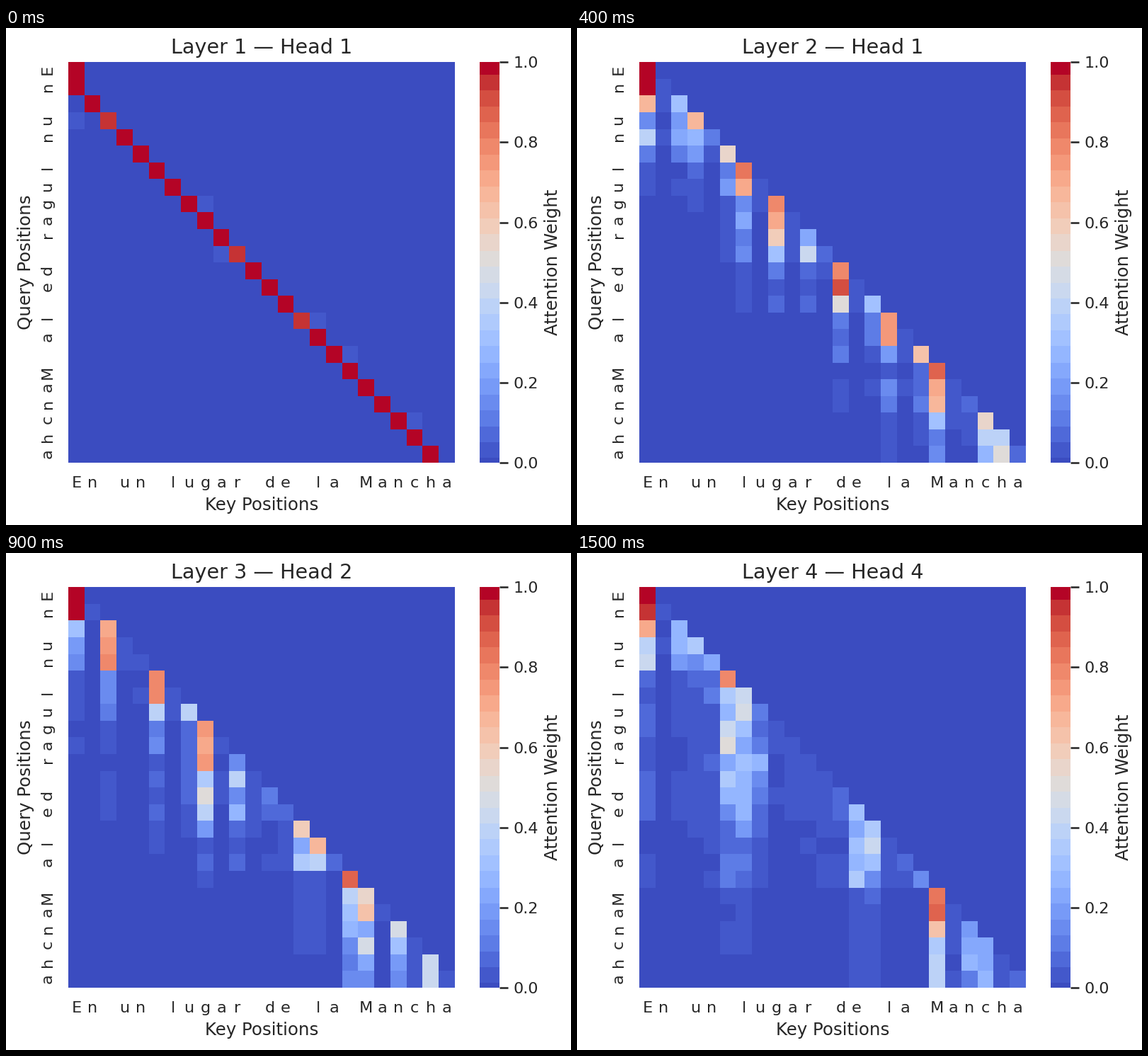
These frames come from a looping animation (798x702 px, 1.6 s). A matplotlib script:

```python
import numpy as np
import matplotlib.pyplot as plt
from matplotlib.animation import FuncAnimation
from matplotlib.colors import ListedColormap

W, H, DPI = 798, 702, 150
PT = 0.98  # scale of all point sizes
TEXT = "En un lugar de la Mancha"
N = len(TEXT)
INK = "0.15"
LAG = np.arange(N)[:, None] - np.arange(N)

plt.rcParams.update({
    "font.family": "DejaVu Sans", "text.color": INK, "axes.labelcolor": INK,
    "xtick.color": INK, "ytick.color": INK, "axes.labelsize": 12 * PT,
    "xtick.labelsize": 11 * PT, "ytick.labelsize": 11 * PT,
})


def banded_coolwarm():
    """Coolwarm reduced to flat steps."""
    levels = np.r_[0, np.arange(.01, 1, .04), 1]
    mids = (levels[:-1] + levels[1:]) / 2
    mids[0], mids[-1] = 0, 1
    band = np.searchsorted(levels[1:-1], np.linspace(0, 1, 512), side="right")
    return ListedColormap(plt.get_cmap("coolwarm")(mids)[band])


def causal(w):
    w = np.where(LAG >= 0, w, 0)
    return w / w.sum(axis=1, keepdims=True)


def attend(seed, reach, strong=(), mild=(), noise=.35):
    """Softmax over key gains that fade with distance."""
    gain = np.full(N, -1.5)
    gain[list(mild)] = 1
    gain[list(strong)] = 2.5
    jitter = np.random.default_rng(seed).normal(scale=noise, size=(N, N))
    return causal(np.exp(gain + jitter - np.maximum(LAG, 0) / reach))


def wander(seed, reach):
    """Attention to randomly chosen strong and mild keys."""
    order = np.random.default_rng(seed).permutation(np.arange(1, N))
    return attend(seed, reach, [0, *order[:6]], order[6:14])


def previous_token(seed):
    miss = np.random.default_rng(seed).exponential(.022, (N, 1))
    miss[:2] = 0
    shift = np.eye(N)[np.maximum(np.arange(N) - 1, 0)]
    return (1 - miss) * shift + miss * attend(seed, 3, noise=1.2)


def uniform(seed):
    w = 1 + np.random.default_rng(seed).normal(scale=.03, size=(N, N))
    w[:, 0] = 1.28
    return causal(w)


HEADS = [
    previous_token(3),
    attend(21, 2, [0]),
    uniform(5),
    attend(22, 6, [0]),

    attend(31, 1.5, (0, 6, 8, 12, 15, 18), (2, 3, 5, 10, 14, 17, 21, 22)),
    wander(32, 1.5),
    attend(33, 1.5, (0, 2, 6, 8, 14, 17), (4, 5, 10, 11, 13, 15, 18, 20, 22)),
    wander(34, 1.5),

    wander(41, 2),
    attend(42, 2, (0, 2, 5, 8, 17, 18), (7, 10, 14, 15, 20, 22)),
    wander(43, 2),
    wander(44, 2),

    wander(51, 2),
    attend(52, 2, (0, 2, 5, 7, 17, 18, 20), (1, 3, 8, 11, 13, 14, 15, 16, 22)),
    wander(53, 3),
    attend(54, 3, (0, 5, 6, 18), (2, 3, 4, 7, 13, 14, 20, 21)),
]


def box(x0, y0, x1, y1):
    return [x0 / W, 1 - y1 / H, (x1 - x0) / W, (y1 - y0) / H]


fig = plt.figure(figsize=(W / DPI, H / DPI), dpi=DPI, facecolor="white")
ax = fig.add_axes(box(88, 48.2, 633.9, 614))
cax = fig.add_axes(box(669, 48.2, 697, 614))

mesh = ax.pcolormesh(HEADS[0], cmap=banded_coolwarm(), vmin=0, vmax=1)
ax.invert_yaxis()
ax.spines[:].set_visible(False)
ax.set_xticks(np.arange(N) + .5, list(TEXT))
ax.set_yticks(np.arange(N) + .5, list(TEXT), rotation="vertical")
ax.tick_params(length=0, pad=9.5 * PT)
ax.set_xlabel("Key Positions", labelpad=4 * PT)
ax.set_ylabel("Query Positions", labelpad=4 * PT)
title = ax.set_title("", fontsize=14 * PT, pad=6 * PT)

bar = fig.colorbar(mesh, cax=cax)
bar.outline.set_visible(False)
bar.set_ticks(np.linspace(0, 1, 6))
bar.ax.tick_params(length=6 * PT, width=1.25 * PT, pad=3.5 * PT)
bar.set_label("Attention Weight", labelpad=4 * PT)


def draw(i):
    layer, head = divmod(i, 4)
    mesh.set_array(HEADS[i])
    title.set_text(f"Layer {layer + 1} — Head {head + 1}")
    return mesh, title


anim = FuncAnimation(fig, draw, frames=len(HEADS), interval=100, repeat=True)
plt.show()
```
